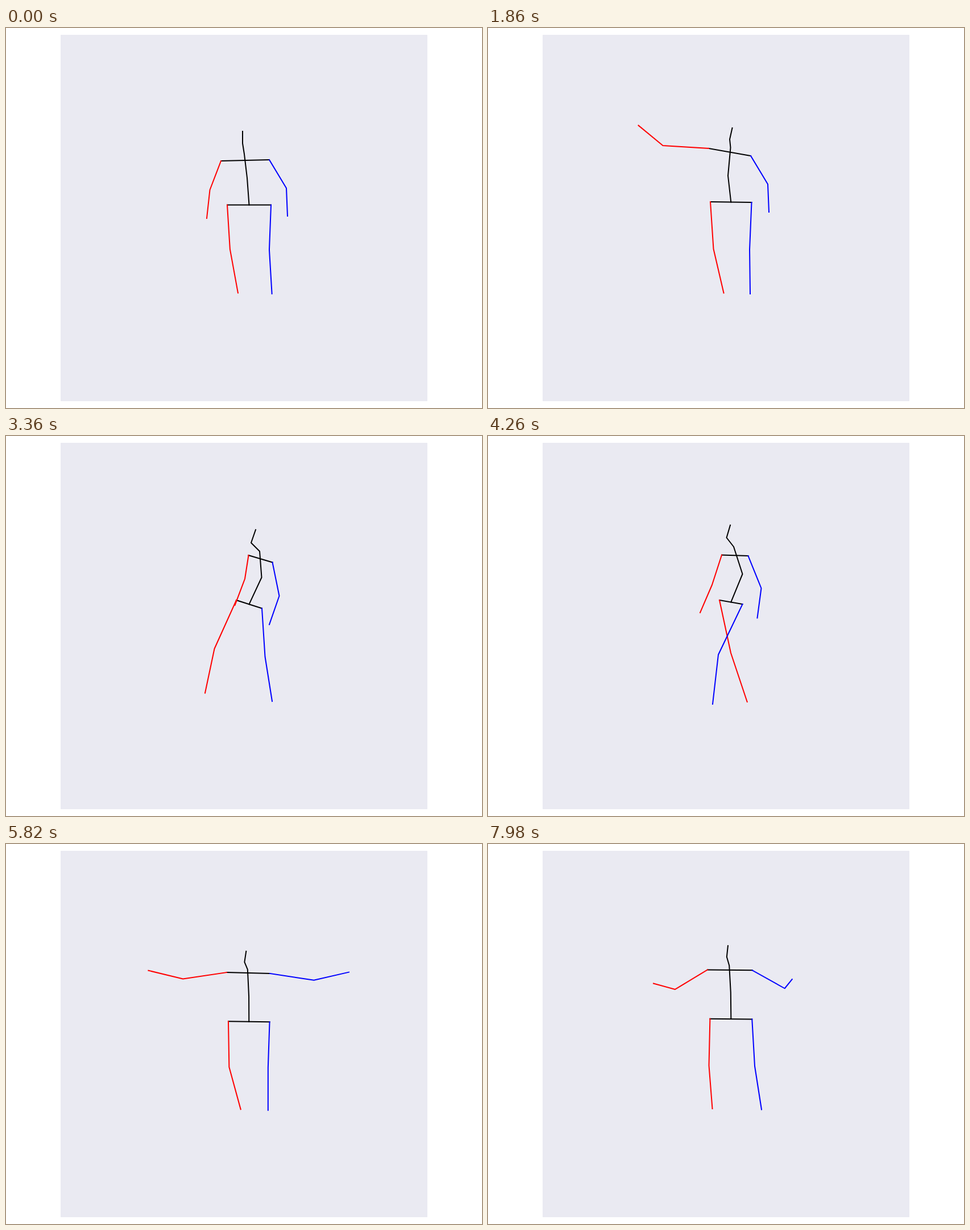
These frames come from a looping animation (837x669 px, 8000 ms). An HTML page:

```html
<!DOCTYPE html>
<html lang="en">
<head>
<meta charset="utf-8">
<title>Stick figure motion</title>
<style>
  html, body { margin: 0; width: 100%; height: 100%; overflow: hidden; background: #fff; }
  svg { display: block; width: 837px; height: 669px; }
  polyline { fill: none; stroke-width: 2; stroke-linecap: square; stroke-linejoin: round; }
  .body { stroke: #000; }
  .right { stroke: #f00; }
  .left { stroke: #00f; }
</style>
</head>
<body>
<svg viewBox="0 0 837 669">
  <rect x="96" y="12" width="645" height="645" fill="#eaeaf2"/>
  <polyline class="body" id="spine"/>
  <polyline class="body" id="shoulders"/>
  <polyline class="body" id="hips"/>
  <polyline class="right" id="rightLeg"/>
  <polyline class="left" id="leftLeg"/>
  <polyline class="right" id="rightArm"/>
  <polyline class="left" id="leftArm"/>
</svg>
<script>
const LOOP = 8000, STEP = 60, SWING = 540, SWING_PEAK = 1860;

// Head, neck, chest, waist | right and left shoulder | right and left hip
const trunks = {
  rest: "416,182 416,203 419,222 424,264 | 378,234 463,232 | 389,311.5 466,311.5",
  stand: "424.5,178 421.5,197 426.5,210.5 428,260 | 389.5,216 465.5,218 | 391,306 463.5,307",
  stride: "439,165 431,188 446,203 449.5,249 | 426.5,210 468.5,222.5 | 405,289 450,303.5",
  step: "426,157 419.5,179 432,195 447.5,243 | 411,209.5 457.5,211 | 407,289 447.5,296",
  squat: "396,316.5 394.5,337.5 405,342 416,364 | 369.5,345 447,346.5 | 390.5,386.5 464,387.5"
};

// Right knee, foot | left knee, foot
const legs = {
  stand: "396.5,389 414.5,466.5 | 460,390 461,468",
  wide: "388.5,390 394.5,466 | 469,391 481,467.5",
  stride: "366.5,374.5 350,452.5 | 455.5,388.5 468,467",
  step: "427,382 455.7,468 | 405,385 395,472",
  squat: "343.5,436 391.5,475 | 470.5,440 458.5,478.5"
};

// Elbow, hand: offsets from the shoulder, positive x pointing away from the body
const arms = {
  hangRight: "19.5,51 25,101", hangLeft: "30,50 32,99",
  wave: "80.5,-5 123.5,-40.5", spread: "77,11 137,-5.7",
  strideRight: "6.5,41.5 24,88", strideLeft: "12,59 -5.5,109.5",
  stepRight: "17,52.5 38,101.5", stepLeft: "23,57 16,109.5",
  squatRight: "73.5,15.5 141,25.5", squatLeft: "81,21 155,42.5",
  frontRight: "57,34.5 95,24", frontLeft: "57,32 70,16"
};

const trunkPlan = [[0, "rest"], [600, "stand"], [2300, "stand"], [2900, "step"], [3360, "stride"],
  [4260, "step"], [5040, "stand"], [5700, "stand"], [6400, "squat"], [6600, "squat"],
  [7480, "stand"], [7680, "stand"], [8500, "rest"]];
const legPlan = [[-800, "wide"], [500, "stand"], [2300, "stand"], [2900, "step"], [3360, "stride"],
  [4260, "step"], [5040, "stand"], [5700, "stand"], [6400, "squat"], [6600, "squat"], [7600, "wide"]];
const rightArmPlan = [[0, "hangRight"], [700, "wave"], [2300, "wave"], [2900, "stepRight"],
  [3360, "strideRight"], [4260, "stepRight"], [5040, "spread"], [5700, "spread"],
  [6400, "squatRight"], [6600, "squatRight"], [7500, "frontRight"]];
const leftArmPlan = [[1900, "hangLeft"], [3360, "strideLeft"], [4260, "stepLeft"], [5040, "spread"],
  [5700, "spread"], [6400, "squatLeft"], [6600, "squatLeft"], [7500, "frontLeft"]];

const parse = text => text.match(/-?[\d.]+,-?[\d.]+/g).map(p => p.split(",").map(Number));
for (const shapes of [trunks, legs, arms])
  for (const name in shapes) shapes[name] = parse(shapes[name]);

const mix = (a, b, k) => a + (b - a) * k;
const mixPoint = (a, b, k) => [mix(a[0], b[0], k), mix(a[1], b[1], k)];

function mixArc(a, b, k) {
  const angle = mix(Math.atan2(a[1], a[0]), Math.atan2(b[1], b[0]), k);
  const radius = mix(Math.hypot(...a), Math.hypot(...b), k);
  return [radius * Math.cos(angle), radius * Math.sin(angle)];
}

function ramp(t, from, to) {
  const u = Math.min(1, Math.max(0, (t - from) / (to - from)));
  return u * u * (3 - 2 * u);
}

function pose(shapes, plan, t, blend = mixPoint) {
  let i = 0;
  while (i < plan.length - 2 && plan[i + 1][0] <= t) i++;
  const [[from, a], [to, b]] = plan.slice(i, i + 2);
  const k = ramp(t, from, to);
  return shapes[a].map((p, j) => blend(p, shapes[b][j], k));
}

function move(point, dx, dy) {
  point[0] += dx;
  point[1] += dy;
}

const attach = (shoulder, offsets, side) =>
  [shoulder, ...offsets.map(([x, y]) => [shoulder[0] + side * x, shoulder[1] + y])];

function draw(id, points) {
  document.getElementById(id).setAttribute("points", points.map(p => p.map(v => v.toFixed(2))).join(" "));
}

function render(t) {
  const [head, neck, chest, waist, shoulderR, shoulderL, hipR, hipL] = pose(trunks, trunkPlan, t);
  const [kneeR, footR, kneeL, footL] = pose(legs, legPlan, t);
  const armR = pose(arms, rightArmPlan, t, mixArc);
  const armL = pose(arms, leftArmPlan, t, mixArc);

  // Waving swings the forearm and tilts the upper body.
  const waving = ramp(t, 100, 700) - ramp(t, 2300, 2900);
  const swing = waving * (1 - Math.cos(2 * Math.PI * (t - SWING_PEAK) / SWING)) / 2;
  move(armR[0], 3 * swing, 3 * swing);
  move(armR[1], 31 * swing, 20 * swing);
  move(head, 5 * waving, -2 * waving);
  move(neck, 3.5 * waving, -waving);
  move(waist, -6 * waving, 0);
  move(shoulderR, -1.5 * waving, -4 * waving);
  move(shoulderL, -3.5 * waving, 7 * waving);

  const kick = ramp(t, 3360, 3540) - ramp(t, 3540, 3800);
  move(kneeR, -24 * kick, -12 * kick);
  move(footR, -64 * kick, -25 * kick);

  draw("spine", [head, neck, chest, waist, mixPoint(hipR, hipL, 0.5)]);
  draw("shoulders", [shoulderR, shoulderL]);
  draw("hips", [hipR, hipL]);
  draw("rightLeg", [hipR, kneeR, footR]);
  draw("leftLeg", [hipL, kneeL, footL]);
  draw("rightArm", attach(shoulderR, armR, -1));
  draw("leftArm", attach(shoulderL, armL, 1));
}

const start = performance.now();
function tick() {
  const t = (performance.now() - start) % LOOP;
  render(Math.floor(t / STEP) * STEP);
  requestAnimationFrame(tick);
}
tick();
</script>
</body>
</html>
```
